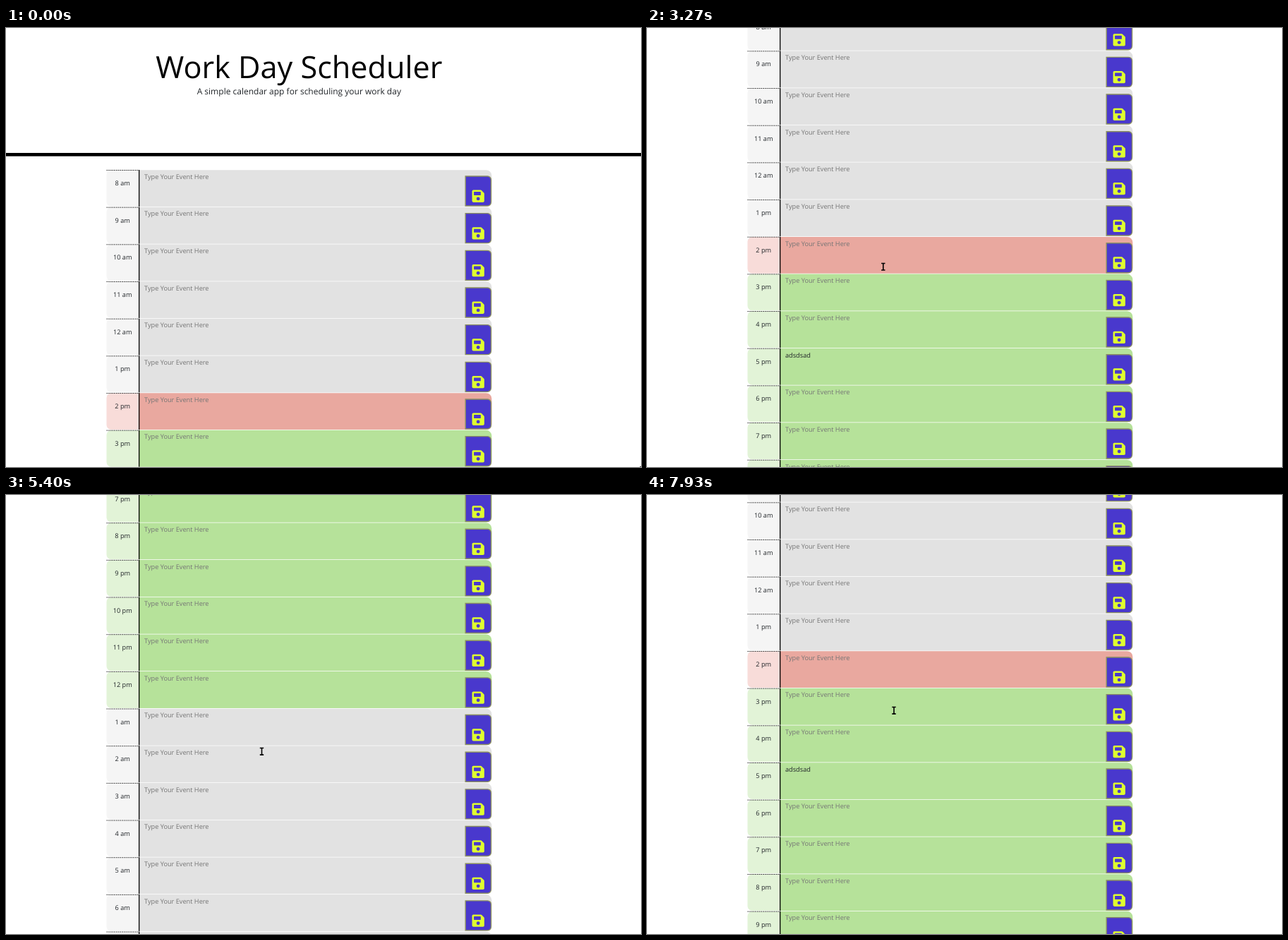
An HTML page that plays this animation: 900x622 px, repeating every 8 s.

```html
<!DOCTYPE html>
<html lang="en">
<head>
<meta charset="utf-8">
<title>Work Day Scheduler</title>
<style>
  html, body { margin: 0; width: 100%; height: 100%; overflow: hidden; background: #fff; }
  svg { display: block; }
  text { font: 9.2px "Open Sans", sans-serif; fill: #212529; text-rendering: geometricPrecision; }
  .mid { text-anchor: middle; }
  .title { font-size: 43.2px; fill: #000; }
  .lead { font-size: 12px; }
  .hint { fill: #757575; }
</style>
</head>
<body>
<svg width="900" height="622" viewBox="0 0 900 622">
  <defs>
    <g id="save">
      <path d="M651.2 9H682.5a5 5 0 0 1 5 5V46a5 5 0 0 1-5 5H651.2Z" fill="#4938cd" stroke="#8b8f62" stroke-width="1.4"/>
      <path d="M662.4 28.6h10.3q.8 0 1.4.6l3.2 3.2q.6.6.6 1.4v10.3a1.8 1.8 0 0 1-1.8 1.8h-13.7a1.8 1.8 0 0 1-1.8-1.8V30.4a1.8 1.8 0 0 1 1.8-1.8Z" fill="#dfff2f"/>
      <rect x="663.1" y="31.1" width="9.8" height="4.9" rx=".5" fill="#4938cd"/>
      <circle cx="669.2" cy="40.9" r="2.45" fill="#4938cd"/>
    </g>
    <path id="hourBox" d="M188 .4H149a6.5 6.5 0 0 0-6.5 6.5V45.5a6.5 6.5 0 0 0 6.5 6.5H188Z"/>
    <path id="eventBox" d="M189 .2H680.4a8 8 0 0 1 8 8V44a8 8 0 0 1-8 8.1H189Z"/>
  </defs>
  <g id="page">
    <text class="mid title" x="415.3" y="70.5">Work Day Scheduler</text>
    <text class="mid lead" x="415.3" y="94.3">A simple calendar app for scheduling your work day</text>
    <rect y="177" width="900" height="4.7"/>
    <g id="rows"></g>
  </g>
  <path id="arrow" d="M0 0V11.5L2.7 9 4.5 13 6.3 12.2 4.6 8.3H8.2Z" fill="#fff" stroke="#000" stroke-width=".8"/>
  <path id="beam" d="M-2.7-4.8H2.7M0-4.8V4.8M-2.7 4.8H2.7" fill="none" stroke="#000" stroke-width="1.6"/>
</svg>
<script>
const el = id => document.getElementById(id);
const FIRST = 201, PITCH = 158 / 3, STEP = 1000 / 15, LOOP = 8000;

// [event colour, hour colour]
const past = ['#e2e2e2', '#f5f5f5'], present = ['#e9a89f', '#f8dcd9'], future = ['#b6e29a', '#e2f3d7'];

// Hours run from 8 to 7; the page calls noon "12 am" and midnight "12 pm".
function row(i) {
  const h = (i + 8) % 24;
  const label = `${h % 12 || 12} ${h === 0 || h > 12 ? 'pm' : 'am'}`;
  const [event, hour] = h === 14 ? present : h === 0 || h > 14 ? future : past;
  const note = h === 17 ? '<text x="196" y="12.8">adsdsad</text>'
    : '<text class="hint" x="196" y="12.8">Type Your Event Here</text>';
  return `<g transform="translate(0 ${FIRST + PITCH * i})">
    <use href="#hourBox" fill="${hour}"/>
    <use href="#eventBox" fill="${event}"/>
    <path d="M142.5 .5H188" stroke="#333" stroke-dasharray="1.7 1"/>
    <rect x="188" width="1.3" height="52"/>
    <text class="mid" x="165.2" y="22">${label}</text>${note}
    <use href="#save"/></g>`;
}
el('rows').innerHTML = Array.from({ length: 24 }, (_, i) => row(i)).join('');

// Each move eases from one step to another (15 steps per second): [from, to, distance...]
const swipes = [
  [34, 37, 66], [39, 50, 159], [52, 61, 204], [64, 77, 227], [77, 83, 186],
  [84, 87, 49], [93, 99, -330], [101, 105, -197], [109, 119, -68]
];
const mouseMoves = [
  [5, 13, -379, -480], [13, 18, -288, 86], [18, 25, 237, 155], [25, 31, -134.7, -45],
  [42, 69, 2.9, 7.5], [77, 81, 25.3, 18.8], [90, 92, 7.1, 2.7], [109, 119, -19.6, -60.7]
];

function ease(p) {
  p = Math.min(1, Math.max(0, p));
  return p * p * (3 - 2 * p);
}

const travel = (moves, s, axis = 0) =>
  moves.reduce((sum, [from, to, ...d]) => sum + d[axis] * ease((s - from) / (to - from)), 0);

function draw(now) {
  const s = Math.floor((now % LOOP) / STEP + 0.1);
  const scroll = travel(swipes, s);
  const x = 899 + travel(mouseMoves, s), y = 621 + travel(mouseMoves, s, 1);
  const overText = x > 189 && x < 650 && y + scroll > FIRST;
  el('page').setAttribute('transform', `translate(0 ${-scroll})`);
  for (const id of ['arrow', 'beam']) {
    el(id).setAttribute('transform', `translate(${x} ${y})`);
    el(id).style.display = (id === 'beam') === overText ? '' : 'none';
  }
}

const start = performance.now();
function tick() {
  draw(performance.now() - start);
  requestAnimationFrame(tick);
}
tick();
</script>
</body>
</html>
```
